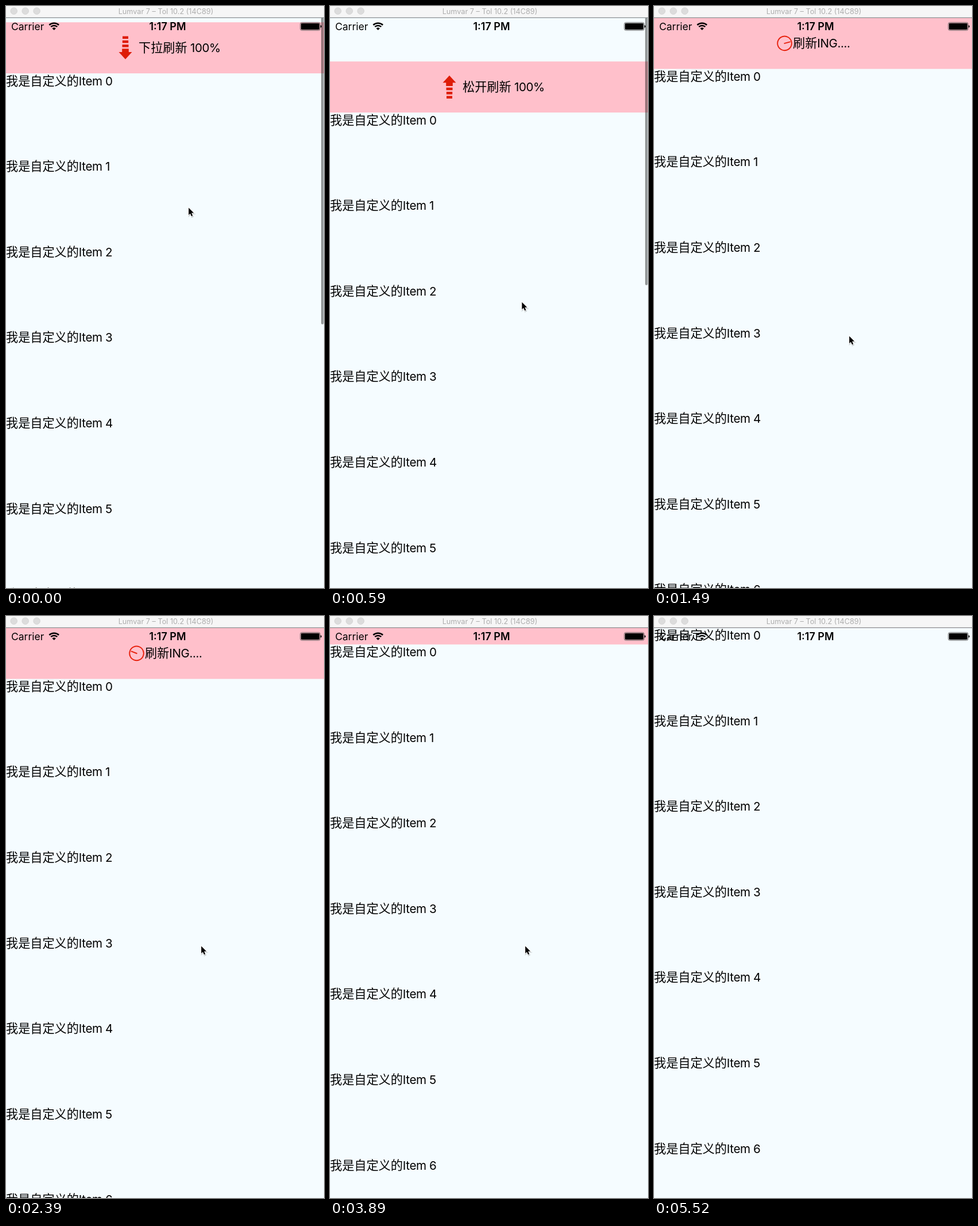
An HTML page for the animation above (5.82 s loop, 554 px wide and 1011 px high).

```html
<!DOCTYPE html>
<html lang="zh-CN">
<head>
<meta charset="utf-8">
<title>Pull to refresh</title>
<style>
html, body { margin: 0; width: 100%; height: 100%; overflow: hidden; background: #f5fcff; }
svg { display: block; width: 554px; height: 1011px; }
text { font-family: Inter, "Noto Sans CJK SC", "Noto Sans CJK", sans-serif; white-space: pre; }
.body { font-size: 21.15px; }
.latin { font-size: 20.6px; letter-spacing: -.02em; }
</style>
</head>
<body>
<svg viewBox="0 0 554 1011">
  <rect width="554" height="1011" fill="#f5fcff"/>

  <g id="list">
    <rect y="-88.7" width="554" height="88.7" fill="#ffc0cb"/>
    <path id="arrow" fill="#de1d08" d="M-5-20H5V-15.5H-5ZM-5.2-12.8H5.2V-8.3H-5.2ZM-5.5-5.6H5.5V-1.1H-5.5ZM-5.8 1.6H5.8V7.5H11.5L0 20L-11.5 7.5H-5.8Z"/>
    <g id="spinner" fill="none" stroke="#e8210d" stroke-width="1.9">
      <circle r="12.3"/>
      <path d="M0 1V-10.5"/>
    </g>
    <text class="body" id="label" y="-37"><tspan id="words"></tspan><tspan class="latin" id="tail"></tspan></text>
  </g>

  <text x="9" y="42" font-size="17.5">Carrier</text>
  <g fill="none" stroke="#000" stroke-width="2.5">
    <path d="M75.3 33A12.3 12.3 0 0 1 92.1 33"/>
    <path d="M78.2 36.2A8 8 0 0 1 89.2 36.2"/>
  </g>
  <path d="M80.6 38.9A4.2 4.2 0 0 1 86.8 38.9L83.7 42Z"/>
  <text x="281.5" y="42" font-size="18" font-weight="600" text-anchor="middle">1:17 PM</text>
  <rect x="512.8" y="28.7" width="34.4" height="13.6" rx="2.6" fill="none" stroke="#555"/>
  <rect x="514" y="30" width="32" height="11" rx="1.4"/>
  <path d="M548 33.2Q549.8 33.8 549.8 35.5Q549.8 37.2 548 37.8Z"/>

  <rect id="bar" x="549" y="20" width="4.4" rx="2.2" fill="#000"/>

  <rect width="554" height="20" fill="#f6f6f6"/>
  <rect y="19.8" width="554" height="1" fill="#72787a"/>
  <g fill="#dcdcdc" stroke="#d0d0d0" stroke-width=".8">
    <circle cx="13.7" cy="8.7" r="5.8"/>
    <circle cx="33.7" cy="8.7" r="5.8"/>
    <circle cx="53.6" cy="8.7" r="5.8"/>
  </g>
  <text x="278.5" y="14" font-size="12.7" fill="#adadad" text-anchor="middle">Lumvar 7 – Tol 10.2 (14C89)</text>

  <g id="cursor">
    <path d="M0 0V13.4L3 10.6L5 15.4L7.5 14.3L5.5 9.7H9.6Z" transform="translate(.6 1.4)" fill="#0003" stroke="#0002" stroke-width="2"/>
    <path d="M.2 .4V13L3 10.4L5.1 15.2L7.2 14.2L5.2 9.5H9.2Z" stroke="#fff" stroke-width="1.8" paint-order="stroke"/>
  </g>
</svg>
<script>
const LOOP = 5820, STEPS = 39, STEP = LOOP / STEPS;
const ROW = 148.6, ICON_Y = -44.4;

// Step numbers at which each stage begins.
const FLIP = 1, RELEASE = 8, REST = 10, DONE = 22, CLOSE = 24, CLOSED = 28;

const $ = id => document.getElementById(id);
const place = (id, x, y, turn = 0, scale = 1) =>
  $(id).setAttribute("transform", `translate(${x} ${y}) rotate(${turn}) scale(${scale})`);
const show = (id, on) => $(id).setAttribute("visibility", on ? "visible" : "hidden");

// Ease-out progress from step a to step b.
function ease(n, a, b, power = 1) {
  const p = Math.min(1, Math.max(0, (n - a) / (b - a)));
  return 1 - (1 - p) ** power;
}

function label(n) {
  if (n < FLIP) return [231, "下拉刷新", " 100%"];
  if (n < RELEASE) return [231, "松开刷新", " 100%"];
  if (n < DONE) return [242, "刷新", "ING...."];
  return [204.5, "刷新完成", "! 100%"];
}

for (let i = 0; i < 7; i++) {
  $("list").insertAdjacentHTML("beforeend",
    `<text class="body" y="${20.5 + i * ROW}">我是自定义的<tspan class="latin">Item ${i}</tspan></text>`);
}

function draw(n) {
  const pull = ease(n, 0, RELEASE, 1.92);
  const bounce = ease(n, RELEASE, REST, 2);
  const close = ease(n, CLOSE, CLOSED, 1.62);
  const top = 117 + 92.5 * pull - 100.2 * bounce - 88.7 * close;
  place("list", 0, top);

  const [x, words, tail] = label(n);
  $("label").setAttribute("x", x);
  $("words").textContent = words;
  $("tail").textContent = tail;

  const flip = 180 * ease(n, 0, FLIP + 1, 2);
  if (n < RELEASE) place("arrow", 208, ICON_Y, flip);
  else place("arrow", 227.3, ICON_Y, flip + 75, .66);
  show("arrow", n <= RELEASE);

  place("spinner", 227.5, ICON_Y, 75 + 36 * (n - REST));
  show("spinner", n > RELEASE && n < DONE);

  $("bar").setAttribute("height", 650 - top);
  $("bar").setAttribute("opacity", .4 * (1 - bounce));

  // Drag down, drift left, then leave through the bottom edge.
  const drift = ease(n, CLOSED, 31);
  const leave = ease(n, 32, 37);
  place("cursor",
    318 + 22 * pull - 72 * drift + 265 * leave,
    350 + 223 * pull + 44 * drift + 440 * leave);
}

function frame() {
  // Steps are held; the small lead absorbs their rounding to 10 ms.
  draw(Math.floor((performance.now() % LOOP + 9) / STEP) % STEPS);
  requestAnimationFrame(frame);
}
frame();
</script>
</body>
</html>
```
